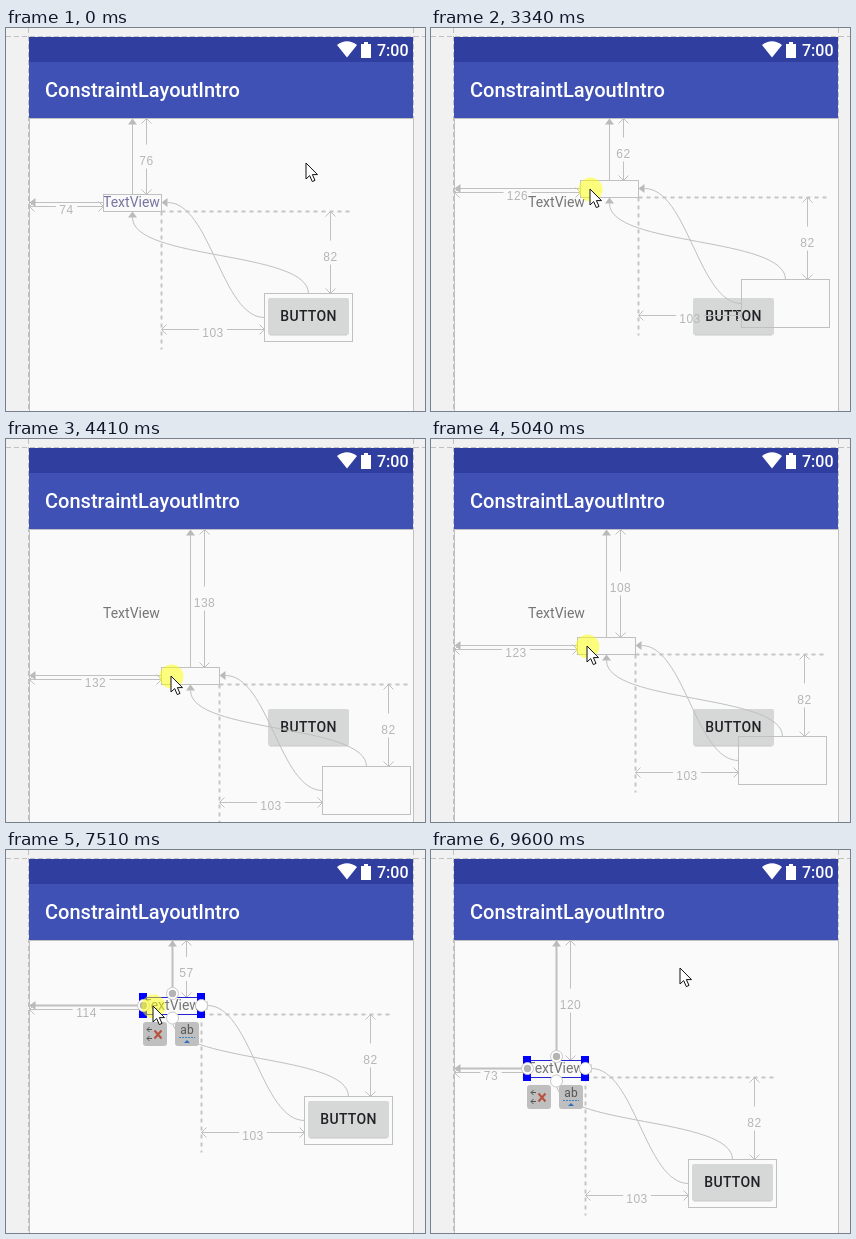
Recreate the animation shown at these times as an HTML page. Size 419 px wide and 383 px high, loop 9840 ms.

```html
<!DOCTYPE html>
<html lang="en">
<head>
<meta charset="utf-8">
<title>Constraint layout drag</title>
<style>
  html, body { margin: 0; width: 100%; height: 100%; overflow: hidden; background: #f1f1f1; }
  svg { display: block; }
  text { font-family: Roboto, sans-serif; white-space: pre; }
  .medium { font-weight: 500; }
  .wire { fill: none; stroke: #c0c0c0; }
  .solid { fill: #bababa; stroke: none; }
  .label { font: 12px "Liberation Sans", sans-serif; letter-spacing: .5px; text-anchor: middle; fill: #b6b6b6; stroke: none; }
  .guide { stroke: #c6c6c6; stroke-width: 2; stroke-dasharray: 4 4; }
</style>
</head>
<body>
<svg width="419" height="383" viewBox="0 0 419 383">
  <path fill="#303f9f" d="M23 9h384v25H23z"/>
  <path fill="#3f51b5" d="M23 34h384v56H23z"/>
  <path fill="#fafafa" d="M23 90h384v293H23z"/>
  <path class="wire" d="M23.5 383V90.5H407.5V383"/>
  <path class="wire" stroke-dasharray="5 3" d="M0 8.5H419M22.5 0V383M407.5 0V90"/>
  <path fill="#fff" d="M341 29.5L331 17Q341 9.500 351 17ZM355 16h3v-2h4v2h3v14h-10z"/>
  <text class="medium" x="371" y="28" font-size="16" fill="#fff">7:00</text>
  <text class="medium" x="39" y="69" font-size="20" fill="#fff">ConstraintLayoutIntro</text>
  <g id="scene"></g>
</svg>
<script>
const LOOP = 9840;
const ORIGIN = { x: 23, y: 90 };
const BOX = { w: 58, h: 17 };
const GAP = { x: 103, y: 82 };
const scene = document.getElementById('scene');

// [time, left margin, top margin] of the dragged view
const dragKeys = [
  [1390, 74, 76], [1550, 75, 109], [2960, 75, 109], [3340, 126, 62], [3950, 128, 104],
  [4410, 132, 138], [4960, 130, 108], [5360, 61, 109], [6200, 61, 109], [6650, 114, 57],
  [7590, 114, 57], [8050, 73, 119], [8210, 73, 120]
];
// [start, end, margins after the drop]
const drags = [[1470, 5430, 61, 109], [6280, 6850, 114, 57], [7660, 8290, 73, 120]];
const presses = [[1320, 5430], [6110, 6820], [7510, 8290]];
const arriveKeys = [[0, 300, 135], [250, 240, 103], [620, 109, 178], [770, 109, 178], [940, 110, 177], [1090, 107, 175]];
const leaveKeys = [[9060, 106, 219], [9600, 249, 118]];

function sample(keys, t) {
  const next = keys.findIndex(key => key[0] > t);
  if (next < 0) return keys.at(-1).slice(1);
  if (next === 0) return keys[0].slice(1);
  const [a, b] = [keys[next - 1], keys[next]];
  const u = (t - a[0]) / (b[0] - a[0]);
  const ease = u * u * (3 - 2 * u);
  return [1, 2].map(i => Math.round(a[i] + (b[i] - a[i]) * ease));
}

const within = (ranges, t) => ranges.some(([from, to]) => t >= from && t < to);
const path = (d, attrs = '') => `<path d="${d}" ${attrs}/>`;
const rect = (x, y, w, h, attrs = '') => `<rect x="${x}" y="${y}" width="${w}" height="${h}" ${attrs}/>`;
const circle = (x, y, r, attrs) => `<circle cx="${x}" cy="${y}" r="${r}" ${attrs}/>`;

// Measured line with open arrowheads and a gap for its number
function dimension(x, y, length, vertical) {
  const mid = length / 2;
  const gap = Math.min(mid, vertical ? 12 : 4 + 3.3 * String(length).length);
  const line = path(`M0 0H${mid - gap}M${mid + gap} 0H${length}M5 -5L0 0L5 5M${length - 5} -5L${length} 0L${length - 5} 5`,
    `transform="translate(${x} ${y})${vertical ? ' rotate(90)' : ''}"`);
  const [lx, ly] = vertical ? [x, y + mid + 8] : [x + mid, y + 7];
  return line + `<text class="label" x="${lx}" y="${ly}">${length}</text>`;
}

const arrowUp = (x, y) => path(`M${x} ${y}l4.500 6h-9z`, 'class="solid"');
const arrowLeft = (x, y) => path(`M${x} ${y}l6 -4.500v9z`, 'class="solid"');

function content(x, y, color) {
  const bx = x + BOX.w + GAP.x, by = y + BOX.h + GAP.y;
  return `<text x="${x}" y="${y + 13}" font-size="14" fill="${color}">TextView</text>` +
    rect(bx + 4, by + 5, 81, 37, 'rx="2" fill="#d6d7d7"') +
    path(`M${bx + 6} ${by + 42}h77`, 'stroke="#c8c9c9"') +
    `<text class="medium" x="${bx + 44.5}" y="${by + 28}" font-size="14" letter-spacing=".3" text-anchor="middle" fill="#222226">BUTTON</text>`;
}

function wires(x, y, left, top, selected) {
  const cx = x + BOX.w / 2, cy = y + 8, right = x + BOX.w, bottom = y + BOX.h;
  const bx = right + GAP.x, by = bottom + GAP.y;
  const buttonTop = bx + 44, buttonLeft = by + 24, pull = 43;
  return '<g class="wire" transform="translate(.5 .5)">' +
    path(`M${right} ${bottom}h189M${right} ${bottom}v138`, 'class="guide"') +
    rect(x, y, BOX.w, BOX.h) + rect(bx, by, 88, 48) +
    path(`M${ORIGIN.x} ${cy}H${x}M${cx} ${ORIGIN.y}V${y}`, selected ? 'stroke-width="2"' : '') +
    arrowLeft(ORIGIN.x, cy) + arrowUp(cx, ORIGIN.y) +
    dimension(ORIGIN.x, y + 12, left, false) +
    dimension(x + 43, ORIGIN.y, top, true) +
    dimension(right, y + 135, GAP.x, false) +
    dimension(x + 227, bottom, GAP.y, true) +
    path(`M${cx} ${bottom + 6}C${cx} ${bottom + 6 + pull} ${buttonTop} ${by - pull} ${buttonTop} ${by}`) +
    path(`M${right + 6} ${cy}C${right + 6 + pull} ${cy} ${bx - pull} ${buttonLeft} ${bx} ${buttonLeft}`) +
    arrowUp(cx, bottom) + arrowLeft(right, cy) + '</g>';
}

function selection(x, y) {
  const right = x + BOX.w, bottom = y + BOX.h, cx = x + BOX.w / 2, cy = y + 8.5;
  const handles = [x, right].flatMap(hx => [y, bottom].map(hy => rect(hx - 4, hy - 4, 8, 8, 'fill="#00f"')));
  const anchor = (ax, ay, linked) => circle(ax, ay, 6, 'fill="#fff" stroke="#c8c8c8"') +
    (linked ? circle(ax, ay, 3.7, 'fill="#b4b4b4"') : '');
  const tile = tx => rect(tx, y + 25, 24, 24, 'rx="3" fill="#bfbfbf"');
  return path(`M${x} ${y + .5}H${right}M${x} ${bottom + .5}H${right}`, 'stroke="#2222d8"') + handles.join('') +
    anchor(x + .5, cy, true) + anchor(cx + .5, y - 3.5, true) + anchor(right + .5, cy) + anchor(cx + .5, bottom + 4) +
    tile(x) + tile(x + 32) +
    path(`M${x + 9} ${y + 32.5}h-5m2.500 -2.500l-2.500 2.500l2.500 2.500M${x + 9} ${y + 41.5}h-5m2.500 -2.500l-2.500 2.500l2.500 2.500`, 'fill="none" stroke="#555"') +
    path(`M${x + 11.5} ${y + 33.5}l7 8m0 -8l-7 8`, 'stroke="#b8503f" stroke-width="2"') +
    `<text x="${x + 44}" y="${y + 37}" font-size="12" text-anchor="middle" fill="#555">ab</text>` +
    path(`M${x + 36} ${y + 40.5}h16`, 'stroke="#3b82c4" stroke-dasharray="2 1"') +
    path(`M${x + 41} ${y + 46}l3 -3l3 3z`, 'fill="#2f6fc0"');
}

function pointer(x, y, pressed) {
  return (pressed ? circle(x + .5, y + .5, 12, 'fill="#ff0" fill-opacity=".5"') : '') +
    path('M0 0V16L3.700 12.600L6.300 18.600L9 17.400L6.400 11.600H11.500Z',
      `transform="translate(${x} ${y})" fill="#fff" stroke="#111"`);
}

function draw(t) {
  const [left, top] = sample(dragKeys, t);
  const x = ORIGIN.x + left, y = ORIGIN.y + top;
  const [, , restLeft, restTop] = drags.findLast(drag => t >= drag[1]) || [0, 0, 74, 76];
  const selected = t >= drags[0][1] && !within(drags, t);
  const [px, py] = t < 1390 ? sample(arriveKeys, t) : t > 9060 ? sample(leaveKeys, t) : [x + 10, y + 9];
  scene.innerHTML =
    content(ORIGIN.x + restLeft, ORIGIN.y + restTop, t < drags[0][0] ? '#7575a0' : '#757575') +
    wires(x, y, left, top, selected) +
    (selected ? selection(x, y) : '') +
    pointer(px, py, within(presses, t));
}

const start = performance.now();
function tick() {
  draw((performance.now() - start) % LOOP);
  requestAnimationFrame(tick);
}
tick();
</script>
</body>
</html>
```
